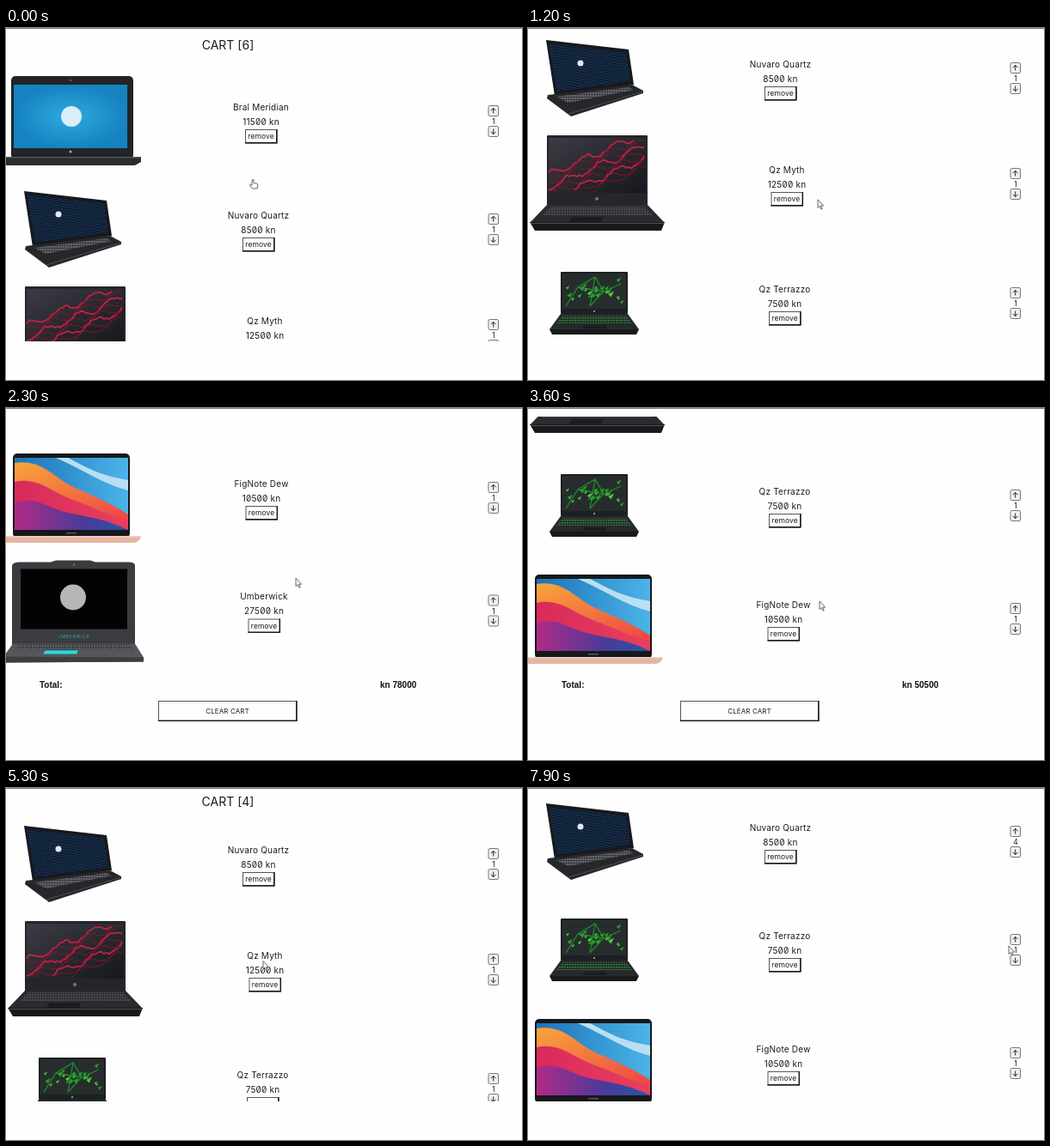
These frames come from a looping animation (600x410 px, 8000 ms). An HTML page:

```html
<!DOCTYPE html>
<html lang="en">
<head>
<meta charset="utf-8">
<title>Cart</title>
<style>
html, body { margin: 0; width: 100%; height: 100%; overflow: hidden; background: #fefefe; }
svg { display: block; }
text { font: 10px Inter, sans-serif; font-feature-settings: "zero"; letter-spacing: .2px; fill: #1c1c1e; text-anchor: middle; }
.heading { font-size: 14px; letter-spacing: 0; }
.small { font-size: 8.5px; letter-spacing: .1px; }
.clear { font-size: 8px; letter-spacing: .1px; }
.total { font: bold 10px "Liberation Sans", Arial, sans-serif; letter-spacing: 0; text-anchor: start; fill: #111; }
</style>
</head>
<body>
<svg id="stage" width="600" height="410" viewBox="0 0 600 410"></svg>
<script>
const poly = (points, fill, extra = '') => `<polygon points="${points}" fill="${fill}" ${extra}/>`;
const rect = (x, y, w, h, fill, extra = '') =>
  `<rect x="${x}" y="${y}" width="${w}" height="${h}" fill="${fill}" ${extra}/>`;
const path = (d, fill, extra = '') => `<path d="${d}" fill="${fill}" ${extra}/>`;
const dot = (x, y, r, fill) => `<circle cx="${x}" cy="${y}" r="${r}" fill="${fill}"/>`;
const label = (x, y, text, cls = '') => `<text x="${x}" y="${y}" class="${cls}">${text}</text>`;
const noise = n => { const v = Math.sin(n * 127.1) * 43758.5; return v - Math.floor(v); };

const defs = `<defs>
<radialGradient id="blue"><stop stop-color="#2fa9e0"/><stop offset="1" stop-color="#1583bf"/></radialGradient>
<linearGradient id="dusk" x1="0" y1="0" x2="1" y2="1"><stop stop-color="#3b3c44"/><stop offset="1" stop-color="#17171d"/></linearGradient>
<linearGradient id="sky"><stop stop-color="#1d72b8"/><stop offset="1" stop-color="#4bb4e8"/></linearGradient>
<linearGradient id="orange" x2=".6" y2="1"><stop stop-color="#f7a63a"/><stop offset="1" stop-color="#ee4a45"/></linearGradient>
<linearGradient id="pink"><stop stop-color="#d92a5b"/><stop offset="1" stop-color="#e8405c"/></linearGradient>
<linearGradient id="purple"><stop stop-color="#b02a86"/><stop offset=".6" stop-color="#4b3a9a"/><stop offset="1" stop-color="#2456a8"/></linearGradient>
<pattern id="scales" width="6" height="6" patternUnits="userSpaceOnUse" patternTransform="rotate(8)">
<path d="M0 3l3-2 3 2M0 6l3-2 3 2" fill="none" stroke="#234c7c" stroke-width=".8"/></pattern>
<pattern id="keys" width="3" height="3" patternUnits="userSpaceOnUse"><rect width="2.2" height="2" fill="#66686c"/></pattern>
<pattern id="greenKeys" width="3" height="3" patternUnits="userSpaceOnUse"><rect width="2.2" height="1.6" fill="#2c7a35"/></pattern>
</defs>`;

// Every laptop is drawn relative to the height of its title.
function blueLaptop() {
  return rect(6, -36, 142, 97, '#232428', 'rx="5"') + rect(9, -26, 132, 74, 'url(#blue)') +
    dot(75, -31, 1.3, '#55585c') + dot(76, 11, 12, '#d9eef8') + dot(75, 52, 1.5, '#aaa') +
    poly('0,58 157,58 157,64 150,68 0,68', '#2b2c30') + rect(0, 58, 157, 1.5, '#55565a');
}
function angledLaptop() {
  const screen = '24,-24 114,-13 119,20 34,32';
  return poly('21,-28 117,-17 123,24 31,37', '#17191e') + poly(screen, '#0d1726') + poly(screen, 'url(#scales)') +
    dot(61, -1, 3.5, '#e4e8ec') +
    poly('23,36 121,24 134,31 134,34 50,61 46,58 22,40', '#26272b') +
    poly('33,38 117,27 123,30 47,45', '#3a3b3f') + poly('33,38 117,27 123,30 47,45', 'url(#keys)') +
    path('M47 58L134 32', 'none', 'stroke="#4d4e53"');
}
function redLaptop() {
  let ridges = '';
  for (let i = 0; i < 9; i++) {
    const points = [];
    for (let x = 24; x < 138; x += 3) {
      const y = 4 + i * 5 - (x - 24) * .43 + 4 * Math.sin(x * .17 + i) + 3 * noise(x + i * 31);
      if (y > -35 && y < 26) points.push(x + ',' + y.toFixed(1));
    }
    ridges += `<polyline points="${points.join(' ')}" fill="none" stroke="${i % 3 ? '#80152c' : '#c3203f'}" stroke-width="${i % 3 ? 1 : 1.8}"/>`;
  }
  return rect(22, -40, 117, 82, '#25262b', 'rx="1"') + rect(24, -37, 113, 64, 'url(#dusk)') + ridges +
    dot(80, 34, 2, '#777') +
    poly('22,41 139,41 159,62 2,62', '#2b2b2f') + poly('26,43 136,43 146,54 15,54', 'url(#keys)', 'opacity=".55"') +
    poly('51,55 87,55 85,61 47,61', '#1d1d20') + poly('2,61 159,61 155,71 8,71', '#19191c') +
    rect(3, 62, 155, 1, '#505155');
}
function greenLaptop() {
  let shards = '';
  for (let i = 0; i < 30; i++) {
    const x = 44 + noise(i) * 64, y = -12 + (noise(i + 50) + noise(i + 90)) * 16, s = 1 + noise(i + 7) * 2.5;
    shards += poly(`${x},${y} ${x + s * 2},${y - s} ${x + s},${y + s}`, i % 3 ? '#28a02e' : '#4ccc3c');
  }
  return rect(38, -20, 78, 49, '#1d2022', 'rx="1"') + rect(40, -18, 74, 41, '#272d2d') +
    path('M44 20L58 -2 78 -14 88 3 72 20M58 -2L88 3M78 -14L72 20M88 3L108 -6', 'none', 'stroke="#218a2c" stroke-width="1.3"') +
    shards + dot(77, 26, 1.2, '#888') +
    poly('38,29 116,29 129,47 25,47', '#26292a') + poly('40,31 114,31 121,40 33,40', 'url(#greenKeys)') +
    poly('65,42 90,42 91,46 64,46', '#1b1d1e') + poly('25,47 129,47 126,53 28,53', '#17191a');
}
function roseLaptop() {
  return rect(8, -35, 136, 98, '#17181b', 'rx="5"') + rect(10, -30, 132, 84, 'url(#sky)') +
    path('M72 -30C92 -20 106 -10 142 -4V8C112 0 90 -16 58 -30Z', '#b9dff2') +
    path('M10 -24C36 -28 50 -14 66 -3S108 14 142 36V54H10Z', 'url(#orange)') +
    path('M10 -2C38 -8 52 10 78 19S118 38 142 42V54H10Z', 'url(#pink)') +
    path('M10 22C34 14 46 28 72 34S112 40 142 54H10Z', 'url(#purple)') +
    rect(70, 57, 12, 1.5, '#55565a') + path('M0 61H157Q155 69 148 69H0Z', '#e5b5a3') + rect(0, 61, 157, 1.5, '#f2cfc2');
}
function glowLaptop() {
  return path('M7 58V-36Q8 -40 16 -40H52L58 -42H98L104 -40H142Q150 -40 150 -36V58Z', '#3a3c40') +
    rect(17, -32, 124, 70, '#030304') + dot(79, -37, 1, '#888') + dot(78, 1, 15, '#b4b6b8') +
    `<text x="79" y="48.5" style="font-size:5px;letter-spacing:.7px;fill:#3aa79b">UMBERWICK</text>` +
    poly('8,55 150,55 160,71 160,76 0,77 0,66', '#55575b') + poly('14,56 144,56 148,62 9,62', '#303236') +
    poly('14,56 144,56 148,62 9,62', 'url(#keys)') + poly('46,63 84,63 82,67 43,67', '#22dfe4') +
    poly('0,70 160,71 160,76 0,77', '#3b3d40');
}

// above and below: distances from the title to the row edges.
const items = [
  { name: 'Bral Meridian', price: 11500, x: 296.5, above: 16, below: 126, art: blueLaptop, gone: 4900 },
  { name: 'Nuvaro Quartz', price: 8500, x: 293.5, above: 0, below: 100, art: angledLaptop },
  { name: 'Qz Myth', price: 12500, x: 301, above: 23, below: 113, art: redLaptop, gone: 5700 },
  { name: 'Qz Terrazzo', price: 7500, x: 298.5, above: 26, below: 112, art: greenLaptop },
  { name: 'FigNote Dew', price: 10500, x: 297, above: 20, below: 80, art: roseLaptop },
  { name: 'Umberwick', price: 27500, x: 300, above: 51.5, below: 89.5, art: glowLaptop, gone: 3000 },
];
const addClicks = [6600, 6800, 7000];

const button = (x, y, w, h) => rect(x + .5, y + .5, w - 1, h - 1, '#fefefe', 'stroke="#55565a"') +
  path(`M${x} ${y + h - .7}H${x + w - .7}V${y}`, 'none', 'stroke="#1b1b1e" stroke-width="1.5"');
const arrow = (y, dir) => rect(561, y - 6, 11.5, 12, '#f1f1f1', 'rx="1.5" stroke="#77787c"') +
  path(`M566.7 ${y + 3 * dir}V${y - 3 * dir}M563.9 ${y - .3 * dir}L566.7 ${y - 3.2 * dir} 569.5 ${y - .3 * dir}`, 'none', 'stroke="#222"');
const row = item => `<g class="row">${item.art()}
  ${label(item.x, 3.6, item.name)}${label(item.x, 20.6, item.price + ' kn')}
  ${button(item.x - 18.5, 26, 37.5, 16.5)}${label(item.x, 37, 'remove', 'small')}
  ${arrow(4.5, 1)}<text class="small qty" x="567" y="20">1</text>${arrow(28.5, -1)}</g>`;

const stage = document.getElementById('stage');
stage.innerHTML = defs + rect(0, 0, 600, 1, '#77777c') + `
<svg y="10" width="600" height="355" viewBox="0 10 600 355"><g id="page">
  <text id="heading" class="heading" x="258" y="25"></text>${items.map(row).join('')}
  <g id="footer">${label(39, 3.5, 'Total:', 'total')}<text id="total" class="total" x="435" y="3.5"></text>
  ${button(177, 19, 161.5, 24)}${label(257.5, 34, 'CLEAR CART', 'clear')}</g>
</g></svg>
<g id="cursor" fill="#fff" stroke="#55565c" stroke-width=".9" stroke-linejoin="round">
  <path id="pointer" d="M0 0V9.5L2.2 7.6 3.8 11.2 5.2 10.6 3.7 7.1H6.6Z"/>
  <path id="hand" d="M-1 1Q0-.6 1 1V4.5L5 5.3Q6 5.6 5.8 7L5 11H-.5L-3.5 7.2Q-3.8 6-2.4 6.2L-1 7.3Z"/>
</g>`;
const $ = id => document.getElementById(id);
const rows = [...stage.querySelectorAll('.row')], quantities = [...stage.querySelectorAll('.qty')];

const scrollKeys = [[900, 0], [1200, 176], [1900, 524], [3600, 524], [3601, 383], [4300, 4], [7500, 4], [7900, 30]];
const cursorX = [[500, 287], [900, 326], [1100, 337], [2400, 337], [2800, 300], [3100, 300], [3500, 339], [3700, 339],
  [4300, 289], [4400, 289], [4700, 296], [5000, 296], [5400, 300], [5800, 300], [6300, 544], [6500, 566], [7300, 566], [7900, 559]];
const cursorY = [[500, 176], [900, 196], [1100, 200], [2400, 198], [2800, 252], [3100, 252], [3500, 225], [3700, 225],
  [4300, 139], [4400, 139], [4700, 122], [5000, 122], [5400, 228], [5800, 228], [6300, 102], [6500, 75], [7300, 75], [7900, 184]];
const handTimes = [[0, 600], [2700, 3200], [4650, 5050], [5350, 5850], [6450, 7350]];

function valueAt(keys, t) {
  const i = keys.findIndex(key => key[0] > t);
  if (i < 0) return keys[keys.length - 1][1];
  if (!i) return keys[0][1];
  const [t0, a] = keys[i - 1], [t1, b] = keys[i];
  return a + (b - a) * (t - t0) / (t1 - t0);
}
const move = (el, x, y) => el.setAttribute('transform', `translate(${x} ${y})`);

function render(t) {
  let edge = 76, count = 0, total = 0;
  items.forEach((item, i) => {
    const visible = !(t >= item.gone);
    rows[i].style.display = visible ? '' : 'none';
    if (!visible) return;
    const quantity = i === 1 ? 1 + addClicks.filter(click => t >= click).length : 1;
    quantities[i].textContent = quantity;
    move(rows[i], 0, edge + item.above);
    edge += item.above + item.below;
    count += quantity;
    total += quantity * item.price;
  });
  const footerY = edge + 13;
  move($('footer'), 0, footerY);
  $('heading').textContent = `CART [${count}]`;
  $('total').textContent = `kn ${total}`;
  move($('page'), 0, -Math.min(Math.round(valueAt(scrollKeys, t)), footerY - 322));
  move($('cursor'), valueAt(cursorX, t), valueAt(cursorY, t));
  const hand = handTimes.some(([from, to]) => t >= from && t < to);
  $('hand').style.display = hand ? '' : 'none';
  $('pointer').style.display = hand ? 'none' : '';
}

function tick() {
  render(Math.floor(performance.now() % 8000 / 100) * 100);
  requestAnimationFrame(tick);
}
tick();
</script>
</body>
</html>
```
